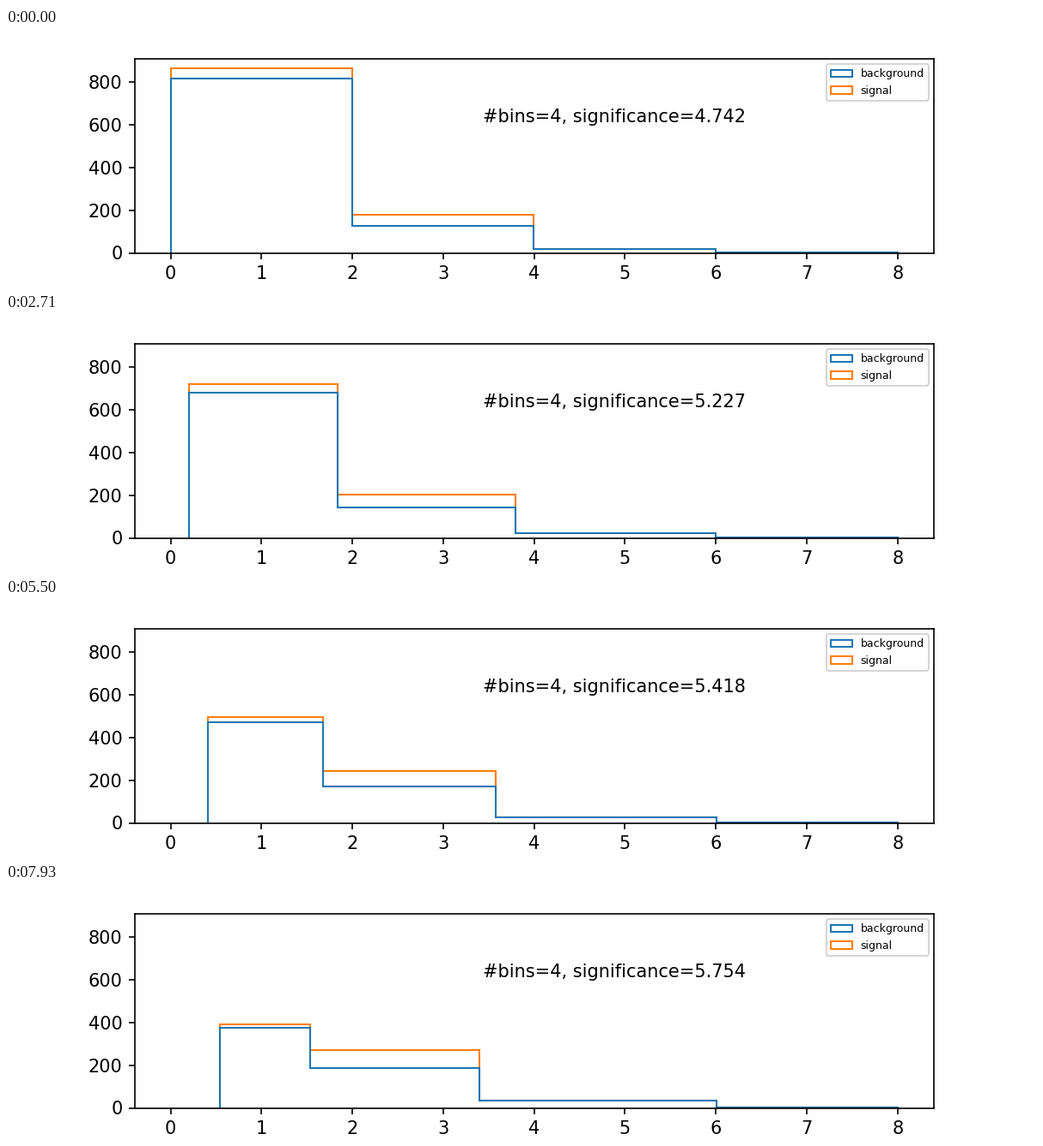
These frames come from a looping animation (1200x300 px, 8000 ms). A matplotlib script:

```python
import numpy as np
import matplotlib.pyplot as plt
from matplotlib.animation import FuncAnimation
from matplotlib.patches import Polygon

LOOP_MS = 8000
FRAME_MS = 20
STEPS = 112

# Optimiser progress at a few steps
KEY_STEPS = [0, 18, 38, 54, 67, 87, 111]
FIRST_EDGE = [0.0055, 0.0975, 0.2015, 0.296, 0.362, 0.457, 0.542]
SIGNIFICANCE = [4.742, 5.076, 5.227, 5.153, 5.239, 5.596, 5.754]

# Number of events above x
BACKGROUND_X = [0.0055, 0.067, 0.0975, 0.2015, 0.296, 0.362, 0.457, 0.542,
                1.535, 1.639, 1.83, 1.9945, 3.398, 3.63, 3.9945, 6, 8]
BACKGROUND_N = [963, 946, 923, 847, 762, 702, 638, 598,
                223, 207, 167, 147, 37, 28, 21, 3, 0]
SIGNAL_X = [0.542, 1.535, 1.9945, 3.39]
SIGNAL_N = [101, 85, 52, 0]


def bin_edges(step):
    u = step / (STEPS - 1)
    first = np.interp(step, KEY_STEPS, FIRST_EDGE)
    return [first, 1.9945 - 0.4595 * u, 3.9945 - 0.5965 * u,
            6 + 0.0045 * u, 8]


def bin_counts(edges, xs, events_above):
    return -np.diff(np.round(np.interp(edges, xs, events_above)))


def histograms(step):
    """Bin edges, background counts and stacked background + signal."""
    edges = bin_edges(step)
    background = bin_counts(edges, BACKGROUND_X, BACKGROUND_N)
    signal = bin_counts(edges, SIGNAL_X, SIGNAL_N)
    return edges, background, background + signal


def outline(edges, heights):
    """Corner points of an open step histogram."""
    x = np.repeat(edges, 2)
    y = np.concatenate([[0], np.repeat(heights, 2), [0]])
    return np.column_stack([x, y])


def step_patch(color, label, zorder):
    patch = Polygon([[0, 0], [1, 1]], closed=False, fill=False, lw=1,
                    edgecolor=color, label=label, zorder=zorder)
    return ax.add_patch(patch)


plt.rcParams["font.family"] = "DejaVu Sans"
fig = plt.figure(figsize=(8, 2), dpi=150, facecolor="white")
fig.subplots_adjust(left=0.125, right=0.9, bottom=0.125, top=0.88)
ax = fig.add_subplot()

# Axes keep a 5 % margin around the first histogram
first_edges, _, first_total = histograms(0)
margin = 0.05 * (first_edges[-1] - first_edges[0])
ax.set_xlim(first_edges[0] - margin, first_edges[-1] + margin)
ax.set_ylim(0, 1.05 * max(first_total))
ax.set_xticks(range(9))
ax.set_yticks(range(0, 801, 200))

background_hist = step_patch("C0", "background", 1.1)
signal_hist = step_patch("C1", "signal", 1)
ax.legend(loc="upper right", fontsize=6)
caption = ax.text(0.6, 0.7, "", transform=ax.transAxes,
                  ha="center", va="center", fontsize=10)


def update(frame):
    # Changes fall on a 10 ms grid, so look slightly ahead
    ms = (frame + 0.75) * FRAME_MS
    step = int(ms * STEPS / LOOP_MS)
    edges, background, total = histograms(step)
    background_hist.set_xy(outline(edges, background))
    signal_hist.set_xy(outline(edges, total))
    significance = np.interp(step, KEY_STEPS, SIGNIFICANCE)
    caption.set_text(f"#bins=4, significance={significance:.3f}")
    return background_hist, signal_hist, caption


anim = FuncAnimation(fig, update, frames=LOOP_MS // FRAME_MS,
                     interval=FRAME_MS, repeat=True, repeat_delay=0)
plt.show()
```
